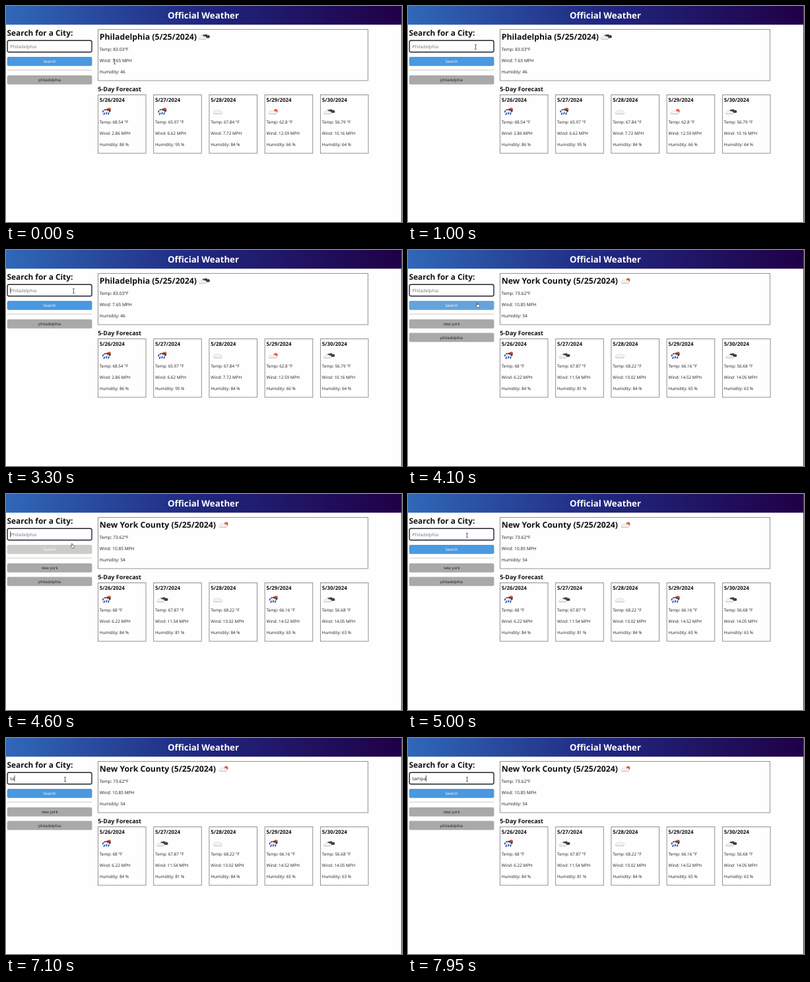
Write an HTML page that moves like this. It is 600 px wide and 327 px high and loops after 8 s.

```html
<!DOCTYPE html>
<html lang="en">
<head>
<meta charset="utf-8">
<title>Official Weather</title>
<style>
html, body { margin: 0; width: 100%; height: 100%; overflow: hidden; background: #fefefe; }
svg { display: block; width: 100vw; height: 100vh; }
text { font-family: "Open Sans", "Noto Sans", sans-serif; text-rendering: geometricPrecision; fill: #1c1c1c; white-space: pre; }
.bold { font-weight: 700; fill: #111; }
.mid { text-anchor: middle; }
.box { fill: none; stroke: #858585; stroke-width: .9; }
</style>
</head>
<body>
<svg id="stage" viewBox="0 0 600 327">
  <defs>
    <linearGradient id="bar">
      <stop offset="0" stop-color="#3068b8"/>
      <stop offset=".5" stop-color="#20267f"/>
      <stop offset="1" stop-color="#200046"/>
    </linearGradient>
    <path id="puff" d="M-5.4 3a1.9 1.9 0 0 1-.2-3.6a2.5 2.5 0 0 1 3.6-1.3a2.9 2.9 0 0 1 4.9.8a2.1 2.1 0 0 1 2.6 4.1z"/>
    <g id="white">
      <use href="#puff" y=".6" fill="#8d8d8d"/>
      <use href="#puff" fill="#f1f1f1" stroke="#cfcfcf" stroke-width=".4"/>
    </g>
    <g id="cloud"><use href="#white"/></g>
    <g id="broken">
      <use href="#puff" transform="translate(2.6 -1) scale(.95)" fill="#3d3d40"/>
      <use href="#white" transform="translate(-2.2 .8) scale(.85)"/>
    </g>
    <g id="sunny">
      <circle cx="3.6" cy="-1.2" r="2.9" fill="#ea5a33"/>
      <use href="#white" transform="translate(-1 .6) scale(.9)"/>
    </g>
    <g id="rain">
      <circle cx="4" cy="-3.4" r="2.7" fill="#e8502f"/>
      <use href="#puff" transform="translate(.6 -2) scale(.85)" fill="#3c3f4c"/>
      <use href="#puff" transform="translate(-1 -.6) scale(.72)" fill="#e9e9ee"/>
      <path d="M-5.2-1l-.6 1.4M-3.2 2.4l-.8 1.8M.2 1.6l-.8 1.8M3.4 2l-.8 1.8" stroke="#2449ad" stroke-width="1.7" stroke-linecap="round"/>
    </g>
  </defs>
</svg>
<script>
const NS = "http://www.w3.org/2000/svg";
const stage = document.getElementById("stage");
const LOOP = 8000;

function add(tag, attrs, parent = stage) {
  const el = document.createElementNS(NS, tag);
  for (const key in attrs) el.setAttribute(key, attrs[key]);
  return parent.appendChild(el);
}
function label(x, y, size, str, cls = "", parent = stage) {
  const el = add("text", { x, y, "font-size": size, class: cls }, parent);
  el.textContent = str;
  return el;
}
const icon = (name, x, y, parent) =>
  add("use", { href: "#" + name, transform: `translate(${x} ${y})` }, parent);
const show = (el, on) => el.setAttribute("visibility", on ? "visible" : "hidden");

// Page frame
add("rect", { width: 600, height: 327, fill: "#fefefe" });
add("rect", { width: 600, height: 28.3, fill: "url(#bar)" });
add("rect", { x: 598.9, y: 0, width: 1.1, height: 327, fill: "#4a4a4e" });
label(299, 18.6, 13.27, "Official Weather", "bold mid").style.fill = "#fff";

// Sidebar
label(1.6, 44.8, 11.85, "Search for a City:", "bold");
add("rect", { x: 2.2, y: 52.2, width: 127.8, height: 17.5, rx: 2.2, fill: "#fff", stroke: "#20242c", "stroke-width": 1.4 });
const field = label(6.6, 64, 6.9, "");
const caret = add("rect", { y: 56.6, width: .7, height: 9, fill: "#111" });
const button = add("rect", { x: 1.7, y: 77, width: 128.7, height: 13.7, rx: 2 });
label(66, 86.2, 6, "Search", "mid").style.fill = "#fff";
add("rect", { x: 1.7, y: 96.6, width: 128.7, height: .8, fill: "#bdbdbd" });

function past(city, y, parent) {
  add("rect", { x: 1.7, y, width: 128.7, height: 13.8, rx: 2, fill: "#a9a9a9" }, parent);
  label(66, y + 9.4, 5.95, city, "mid", parent);
}

// Results
add("rect", { class: "box", x: 139.4, y: 35.4, width: 409, height: 77.6 });
label(139.2, 129.1, 9, "5-Day Forecast", "bold");
const cardX = i => 139.4 + i * 84.25;
for (let i = 0; i < 5; i++) {
  add("rect", { class: "box", x: cardX(i), y: 134.5, width: 72.6, height: 88.5 });
  label(cardX(i) + 2.4, 145.1, 7.9, `5/${26 + i}/2024`, "bold");
}

function report({ title, now, sky, skyX, days, history }) {
  const g = add("g", {});
  label(141.8, 50.6, 12.28, `${title} (5/25/2024)`, "bold", g);
  icon(sky, skyX, 46.6, g);
  [`Temp: ${now[0]}°F`, `Wind: ${now[1]} MPH`, `Humidity: ${now[2]}`]
    .forEach((s, i) => label(141.8, 68.2 + i * 16.65, 6.6, s, "", g));
  days.forEach(([kind, temp, wind, hum], i) => {
    icon(kind, cardX(i) + 13, 160, g);
    [`Temp: ${temp} °F`, `Wind: ${wind} MPH`, `Humidity: ${hum} %`]
      .forEach((s, j) => label(cardX(i) + 2.4, 178.3 + j * 16.75, 6.32, s, "", g));
  });
  history.forEach((city, i) => past(city, 105 + i * 20.4, g));
  return g;
}
const first = report({
  title: "Philadelphia", now: ["83.03", "7.65", 46], sky: "broken", skyX: 300,
  days: [
    ["rain", "68.54", "2.86", 86], ["rain", "65.97", "6.62", 95], ["cloud", "67.84", "7.72", 84],
    ["sunny", "62.8", "12.59", 66], ["broken", "56.79", "10.16", 64]
  ],
  history: ["philadelphia"]
});
const second = report({
  title: "New York County", now: ["73.62", "10.85", 54], sky: "sunny", skyX: 330,
  days: [
    ["rain", "68", "6.22", 84], ["broken", "67.87", "11.54", 81], ["cloud", "68.22", "10.02", 84],
    ["rain", "66.16", "14.52", 65], ["broken", "56.68", "14.05", 63]
  ],
  history: ["new york", "philadelphia"]
});

// Pointers
const beam = add("g", { fill: "none", stroke: "#222", "stroke-width": .7 });
add("path", { d: "M-1.5-3.5Q0-3.5 0-2.7Q0-3.5 1.5-3.5M0-2.7V2.7M-1.5 3.5Q0 3.5 0 2.7Q0 3.5 1.5 3.5" }, beam);
const skin = { fill: "#fff", stroke: "#222", "stroke-width": .6, "stroke-linejoin": "round" };
const arrow = add("path", { ...skin, d: "M0 0V7L1.6 5.5L2.7 8L3.7 7.5L2.7 5.1H4.9z" });
const hand = add("path", { ...skin, d: "M-1-2.2Q-.4-3 .2-2.2V0L2.6.5Q3.4.8 3.2 1.8L2.6 4.4H-.4L-2.4 1.8Q-2.2.8-1 1.5z" });

// Timeline
const SENT = 3150, LOADED = 3350;
const typing = [
  { text: "new york", at: [1400, 1550, 1700, 1850, 2000, 2150, 2300, 2450], end: SENT },
  { text: "tampa", at: [6800, 7100, 7450, 7700, 7850], end: LOOP }
];
const track = [
  [0, 164.5, 84.5], [150, 164.5, 84.5], [800, 102.5, 62],
  [3550, 102.5, 62], [4080, 105.5, 82.5], [4250, 105.5, 82.5],
  [4600, 100.3, 77.4], [5000, 89.5, 62.7], [LOOP, 89.5, 62.7]
];
const clamp = v => Math.max(0, Math.min(1, v));
const smooth = v => v * v * (3 - 2 * v);

// CSS "ease" curve, solved by bisection
function ease(x) {
  const curve = (a, b, s) => 3 * a * s * (1 - s) ** 2 + 3 * b * s * s * (1 - s) + s ** 3;
  let lo = 0, hi = 1;
  for (let i = 0; i < 16; i++) {
    const m = (lo + hi) / 2;
    if (curve(.25, .25, m) < x) lo = m; else hi = m;
  }
  return curve(.1, 1, lo);
}
function pointerAt(t) {
  const i = Math.max(1, track.findIndex(k => k[0] > t));
  const [t0, x0, y0] = track[i - 1], [t1, x1, y1] = track[i];
  const p = smooth((t - t0) / (t1 - t0));
  return [x0 + (x1 - x0) * p, y0 + (y1 - y0) * p];
}
function typedAt(t) {
  for (const { text, at, end } of typing)
    if (t >= at[0] && t < end) {
      const n = at.filter(a => a <= t).length;
      return { text: text.slice(0, n), since: at[n - 1] };
    }
  return { text: "", since: t < SENT ? 350 : SENT };
}

let shown = null;
function draw(t) {
  const { text, since } = typedAt(t);
  if (shown !== text) {
    shown = text;
    field.textContent = text || "Philadelphia";
    field.style.fill = text ? "#1c1c1c" : "#757575";
    caret.setAttribute("x", 6.4 + (text ? field.getComputedTextLength() : 0));
  }
  show(caret, t >= since && (t - since) % 1000 < 500);

  show(first, t < LOADED);
  show(second, t >= LOADED);

  const h = ease(clamp((t - 4020) / 500)) - ease(clamp((t - 4610) / 450));
  const mix = (a, b) => Math.round(a + (b - a) * h);
  button.setAttribute("fill", `rgb(${mix(74, 204)},${mix(152, 203)},${mix(224, 199)})`);

  const [x, y] = pointerAt(t);
  const overButton = x < 130.4 && y > 77 && y < 90.7;
  const overText = x > 142 || (x < 130 && y > 51.5 && y < 70.5);
  const active = overButton ? hand : overText ? beam : arrow;
  for (const p of [beam, arrow, hand]) show(p, p === active);
  active.setAttribute("transform", `translate(${x} ${y})`);
}

const start = performance.now();
function tick() {
  draw((performance.now() - start) % LOOP);
  requestAnimationFrame(tick);
}
tick();
</script>
</body>
</html>
```
